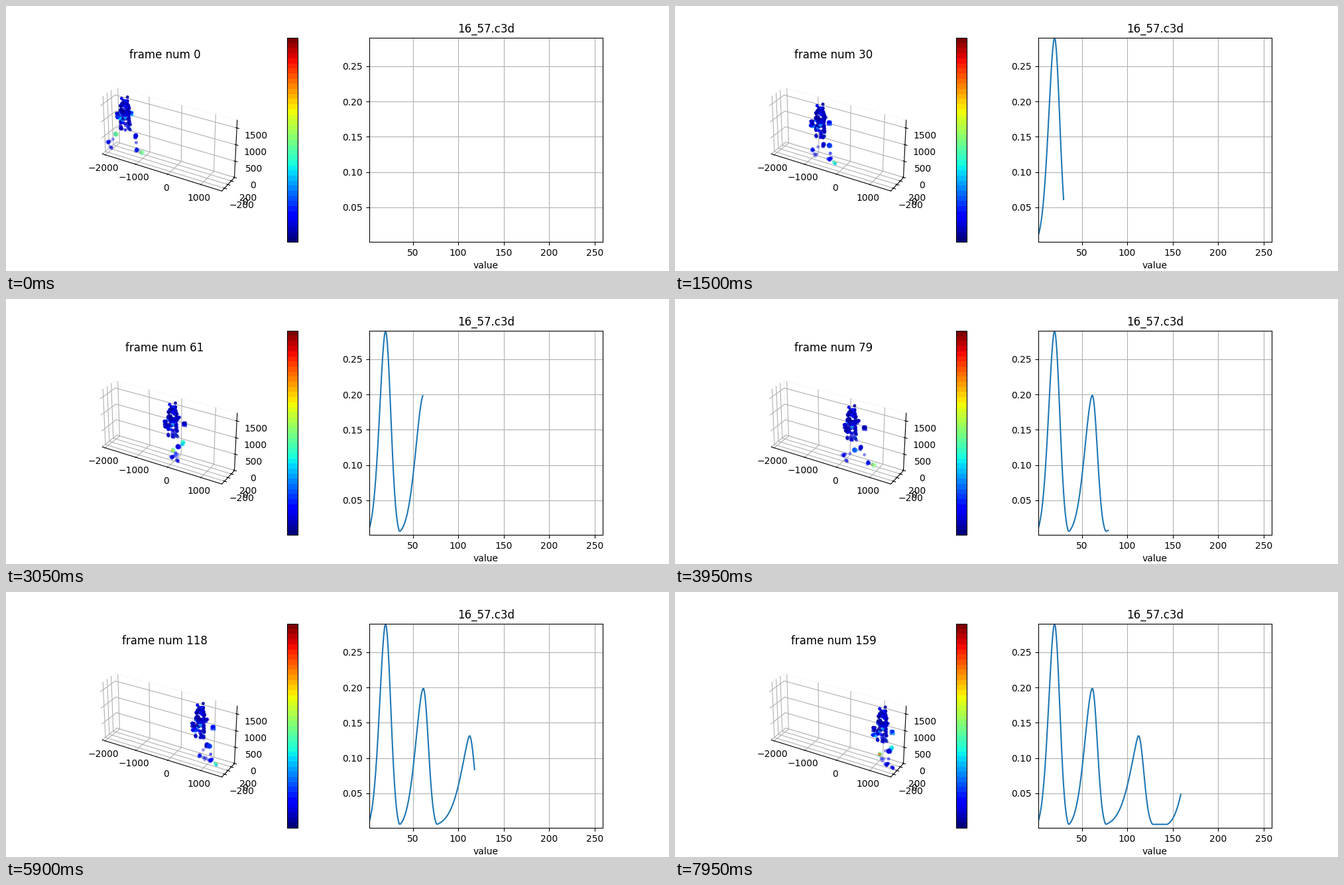
These frames come from a looping animation (1000x400 px, 8 s). A matplotlib script:

```python
import matplotlib.pyplot as plt
import numpy as np
from matplotlib.animation import FuncAnimation
from matplotlib.cm import ScalarMappable
from matplotlib.colors import Normalize

FRAMES = 160
INTERVAL = 50
MID_Y = 55          # lateral position of the walker, mm
THIGH = SHIN = 425

rng = np.random.default_rng(16)


def bump(u, center, width):
    return np.exp(-((u - center) / width) ** 2)


def peak(t, center, height, rise, fall, power):
    """Lopsided bell with a short foot: slow on the left, steep on the right."""
    d = t - center
    bell = np.where(d < 0, np.exp(-(np.abs(d) / rise) ** power),
                    np.exp(-(d / fall) ** 2))
    return height * np.clip(bell - 0.03, 0, None) / 0.97


# ---- speed curve: one peak per step ----
steps = np.arange(FRAMES)
curve = (0.006 + peak(steps, 20, 0.2845, 9.5, 8.1, 1.8)
         + peak(steps, 61.6, 0.193, 12.4, 7.8, 1.75)
         + peak(steps, 112.4, 0.126, 14.5, 8.2, 1.4)
         + peak(steps, 173, 0.114, 14.5, 8, 1.83))


# ---- walker ----
# each swing of a foot: start, end, toe x before, toe x after
LEFT = dict(side=1, y=135, swings=[(-35, 7, -3050, -955), (40, 81, -955, 863),
                                   (140, 184, 863, 1500)])
RIGHT = dict(side=-1, y=-25, swings=[(2, 40, -2040, 89), (83, 130, 89, 1468)])

# markers per joint and their spread in mm
JOINTS = dict(shoulder=(6, 28), elbow=(8, 28), hand=(12, 32), thigh=(4, 40),
              knee=(13, 25), shin=(1, 15), ankle=(11, 25), toe=(5, 22))


def make_parts():
    """Fixed marker offsets around each joint and their colour weights."""
    return {name: (rng.normal(0, spread, (n, 3)), rng.uniform(0.4, 1.1, n))
            for name, (n, spread) in JOINTS.items()}


def shell(n, low, high, depth, width):
    """Random points on an upright tube; width is a function of height."""
    a = rng.uniform(0, 2 * np.pi, n)
    z = rng.uniform(low, high, n)
    return np.column_stack([depth * np.cos(a), width(z) * np.sin(a), z])


TRUNK = np.vstack([
    shell(85, 730, 1500, 100, lambda z: 145 + 30 * np.cos((z - 900) / 75)),
    shell(28, 1460, 1690, 80, lambda z: 75),
    [[0, 150, 1650]],
])
TRUNK_LEVEL = 0.02 + 0.05 * rng.exponential(0.8, len(TRUNK))
LEFT["parts"], RIGHT["parts"] = make_parts(), make_parts()


def body_place(t):
    """The walker slows down steadily."""
    return -1574 + 3560 * (1 - np.exp(-t / 113))


def leg(t, body_x, limb):
    """Joint places and colour levels of one leg."""
    toe_x = limb["swings"][0][2]
    lift = pitch = 0
    toe_l, ankle_l, knee_l = 0.15, 0.14, 0.09
    for start, end, x0, x1 in limb["swings"]:
        u = (t - start) / (end - start)
        f = np.clip(u, 0, 1)
        toe_x += (x1 - x0) * f * f * (3 - 2 * f)
        lift += 50 * np.sin(np.pi * f)
        pitch += np.interp(u, [-0.5, -0.2, 0.45, 0.9, 1.05],
                           [0, 1, 0.9, -0.2, 0])
        toe_l += 0.9 * bump(u, 0.92, 0.3)
        ankle_l += 0.6 * bump(u, 0.42, 0.2)
        knee_l += 0.5 * bump(u, -0.03, 0.05) + 0.4 * bump(u, 0.5, 0.2)

    a = np.radians(15 + 50 * pitch)
    toe = np.array([toe_x, limb["y"], 65 + lift])
    ankle = toe + [-160 * np.cos(a), 0, 160 * np.sin(a)]
    hip = np.array([body_x, MID_Y + 70 * limb["side"], 870])

    # knee bends forward in the walking plane
    d = ankle - hip
    span = np.hypot(d[0], d[2])
    bend = np.sqrt(max(THIGH ** 2 - (span / 2) ** 2, 0))
    knee = (hip + ankle) / 2 + bend / span * np.array([-d[2], 0, d[0]])
    return dict(thigh=(hip + (knee - hip) * 0.3, 0.08), knee=(knee, knee_l),
                shin=((knee + ankle) / 2, 0.12), ankle=(ankle, ankle_l),
                toe=(toe, toe_l))


def arm(t, body_x, limb):
    side = limb["side"]
    if side > 0:
        reach = 60 + 230 * np.sin(np.pi * t / 200)
    else:
        reach = -50 - 60 * np.sin(np.pi * t / 60)
    y = MID_Y + 185 * side
    shoulder = np.array([body_x, y, 1390])
    hand = np.array([body_x + reach, y + 30 * side,
                     1180 - 30 * side - 1.3 * t])
    elbow = (shoulder + hand) / 2 + [-70, 15 * side, -50]
    level = 0.2 + 0.12 * np.cos(2 * np.pi * t / 150)
    return dict(shoulder=(shoulder, 0.06), elbow=(elbow, 0.09),
                hand=(hand, level))


def markers(t):
    """All marker places and colour levels at step t."""
    body_x = body_place(t)
    points, levels = [TRUNK + [body_x, MID_Y, 0]], [TRUNK_LEVEL]
    for limb in (LEFT, RIGHT):
        joints = leg(t, body_x, limb) | arm(t, body_x, limb)
        for name, (place, level) in joints.items():
            offsets, weights = limb["parts"][name]
            points.append(place + offsets)
            levels.append(level * weights)
    return np.vstack(points), np.concatenate(levels)


# ---- figure ----
fig = plt.figure(figsize=(10, 4), dpi=100)
norm = Normalize(0, 1)

space = fig.add_subplot(1, 2, 1, projection="3d")
limits = dict(xlim=(-2092, 1612), ylim=(-352, 388), zlim=(-8, 1728))
space.set(**limits, xticks=range(-2000, 1001, 1000),
          yticks=range(-200, 201, 200), zticks=range(0, 1501, 500))
space.set_box_aspect([hi - lo for lo, hi in limits.values()])
for axis in (space.xaxis, space.yaxis, space.zaxis):
    axis.pane.set(fill=False, edgecolor="0.95")
fig.colorbar(ScalarMappable(norm, plt.get_cmap("jet", 40)), ax=space,
             pad=0.2, ticks=[])

graph = fig.add_subplot(1, 2, 2)
graph.set(xlim=(2, 259), ylim=(0.001, 0.2903), xlabel="value",
          title="16_57.c3d", xticks=range(50, 251, 50),
          yticks=np.arange(1, 6) * 0.05)
graph.grid(True)
line, = graph.plot([], [])

shown = []


def update(n):
    while shown:
        shown.pop().remove()
    points, levels = markers(n)
    shown.append(space.scatter(*points.T, c=levels, cmap="jet", norm=norm,
                               s=13, linewidths=0))
    space.set(**limits)
    space.set_title(f"frame num {n}")
    line.set_data(steps[2:n + 1], curve[2:n + 1])
    return [line, *shown]


anim = FuncAnimation(fig, update, frames=FRAMES, interval=INTERVAL,
                     init_func=lambda: [], repeat=True, repeat_delay=0)
plt.show()
```
